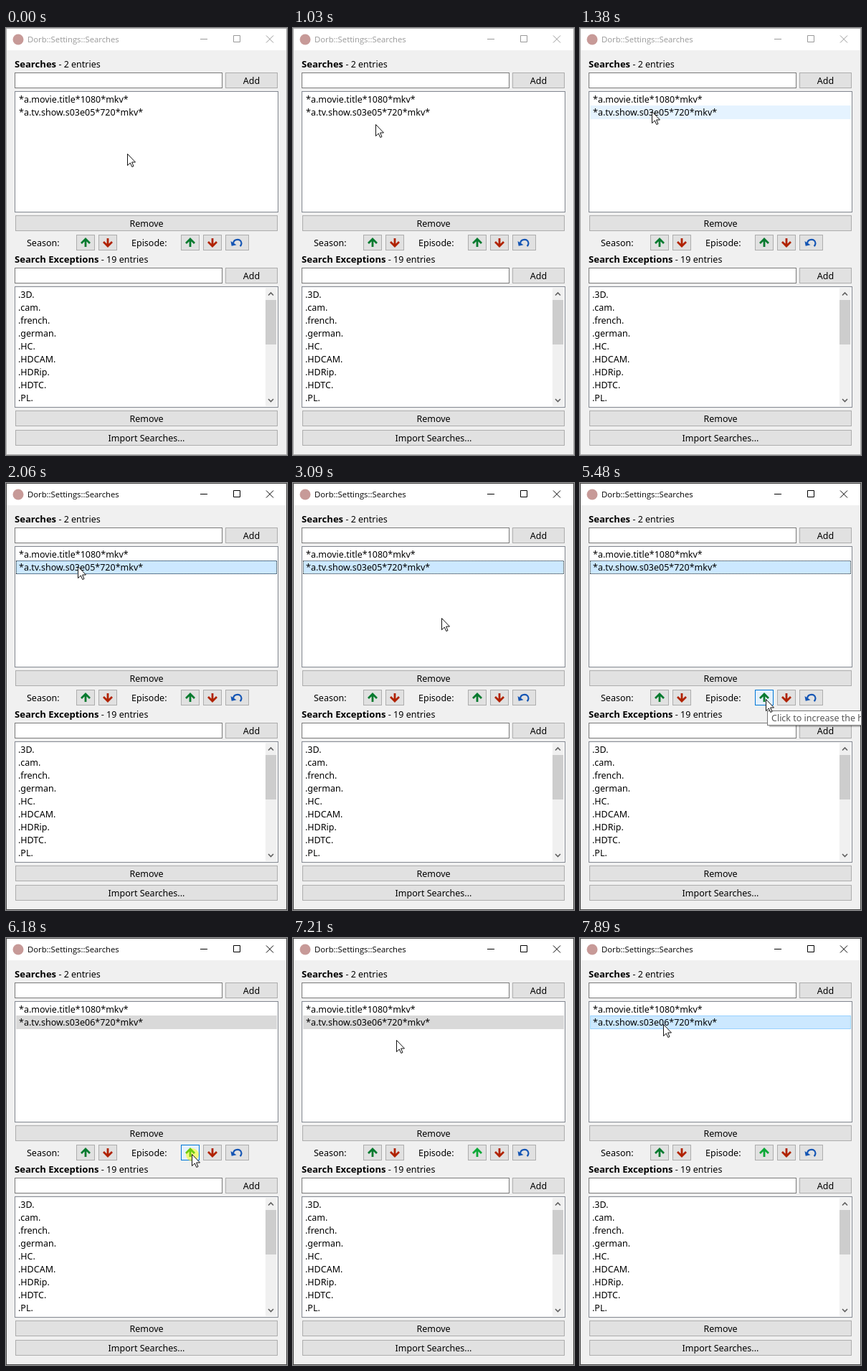
Write an HTML page that moves like this. It is 392 by 595 pixels and loops after 8 s.

```html
<!DOCTYPE html>
<html lang="en">
<head>
<meta charset="utf-8">
<style>
  html, body { margin: 0; width: 100%; height: 100%; overflow: hidden; background: #f0f0f0; }
  svg { display: block; }
  text { font: 12.5px "Noto Sans", "Open Sans", sans-serif; white-space: pre; }
  .bold { font-weight: bold; font-size: 13.1px; }
  #title { font: 11.3px "Open Sans", "Noto Sans", sans-serif; }
  .mid { text-anchor: middle; }
  .line { fill: none; }
</style>
</head>
<body>
<svg id="stage" width="392" height="595" viewBox="0 0 392 595"></svg>
<script>
const LOOP = 8000;
const stage = document.getElementById('stage');

// One-pixel bordered box covering x..x+w, y..y+h
const box = (x, y, w, h, fill, stroke, id = '') =>
  `<rect id="${id}" x="${x + .5}" y="${y + .5}" width="${w - 1}" height="${h - 1}" fill="${fill}" stroke="${stroke}"/>`;
const text = (x, y, s, attrs = '') => `<text x="${x}" y="${y}" ${attrs}>${s}</text>`;
const button = (x, y, w, label = '', id) =>
  box(x, y, w, 22, '#e1e1e1', '#adadad', id) + text(x + w / 2, y + 15.5, label, 'class="mid"');
const line = (d, color, width = 1, attrs = '') =>
  `<path class="line" d="${d}" stroke="${color}" stroke-width="${width}" ${attrs}/>`;
const arrow = (cx, dir, color, id = '') =>
  line(`M${cx} ${299 + 6 * dir}V${299 - 5 * dir}M${cx - 6} ${299 + dir}l6 ${-6 * dir}l6 ${6 * dir}`, color, 2.8, `id="${id}"`);

const heading = (y, name, count) =>
  text(12, y, `<tspan class="bold">${name}</tspan> - ${count} entries`);
const section = (y, name, count) => heading(y, name, count) +
  box(12, y + 7, 290, 22, '#fff', '#7a7a7a') + button(306, y + 7, 73, 'Add') +
  box(12, y + 33, 368, 169, '#fff', '#828790') + button(13, y + 206, 366, 'Remove');

const exceptions = ['3D', 'cam', 'french', 'german', 'HC', 'HDCAM', 'HDRip', 'HDTC', 'PL'];

stage.innerHTML =
  '<rect width="392" height="595" fill="#f0f0f0"/><rect width="392" height="31" fill="#fff"/>' +
  box(0, 0, 392, 595, 'none', '#aaa', 'frame') +
  '<circle cx="17" cy="16" r="7.5" fill="#c79a98"/>' +
  text(30, 20, 'Dorb::Settings::Searches', 'id="title"') +
  line('M271 15.5h10M317.5 10.5h9v9h-9zM363 10.5l10 10M373 10.5l-10 10', '#999', 1, 'id="controls"') +
  section(55, 'Searches', 2) +
  box(14, 108, 364, 19, 'none', 'none', 'row') +
  line('M14 108.5H378M14 126.5H378M14.5 109V126M377.5 109V126', '#222', 1, 'id="focus" stroke-dasharray="1 1"') +
  text(18, 104, '*a.movie.title*1080*mkv*') +
  text(18, 122, '', 'id="show"') +
  text(29, 304, 'Season:') + text(175, 304, 'Episode:') +
  button(98, 288, 26, '', 'seasonUp') + button(129, 288, 26, '', 'seasonDown') +
  button(244, 288, 26, '', 'episodeUp') + button(275, 288, 26) + button(306, 288, 33) +
  arrow(111, 1, '#067a2e') + arrow(142, -1, '#b02200') +
  '<circle id="halo" cx="260" cy="302" r="9" fill="#ff0" fill-opacity=".5"/>' +
  arrow(257, 1, '#067a2e', 'upIcon') + arrow(288, -1, '#b02200') +
  line('M317 300C318 293.5 328 293 328.5 300Q328.5 302.5 326.5 304', '#1455b4', 2.2) +
  '<path d="M313.5 297l1.2 6.8l6.8-1.6z" fill="#1455b4"/>' +
  section(327, 'Search Exceptions', 19) +
  exceptions.map((s, i) => text(17, 376 + 18 * i, `.${s}.`)).join('') +
  '<rect x="362" y="362" width="16" height="165" fill="#f0f0f0"/>' +
  '<rect x="362" y="379" width="15" height="62" fill="#cdcdcd"/>' +
  line('M366 372.5l3.5-3.5l3.5 3.5M366 517l3.5 3.5l3.5-3.5', '#606060', 1.6) +
  button(13, 560, 366, 'Import Searches...') +
  '<g id="tip"><rect x="264" y="320" width="130" height="20" fill="#000" fill-opacity=".25"/>' +
  box(261, 317, 140, 21, '#fff', '#767676') +
  text(267, 332, 'Click to increase the highlighted', 'fill="#575757"') + '</g>' +
  '<path id="cursor" d="M.5 .5V16.6L4.3 13L6.8 18.5L9 17.5L6.6 12H11.5Z" fill="#fff" stroke="#111"/>';

const el = id => document.getElementById(id);
const set = (id, attrs) => { for (const k in attrs) el(id).setAttribute(k, attrs[k]); };
const show = (id, on) => set(id, { visibility: on ? 'visible' : 'hidden' });

const rows = {
  plain: ['none', 'none'],
  hover: ['#e5f3ff', '#e5f3ff'],
  picked: ['#cce8ff', '#cce8ff'],
  hot: ['#cce8ff', '#99d1ff'],
  blurred: ['#d9d9d9', '#d9d9d9']
};
const faces = {
  rest: ['#e1e1e1', '#adadad'],
  fading: ['#e3e9ee', '#6f9abf'],
  hover: ['#e5f1fb', '#0078d7']
};
// Start time, pointer position, list row look
const steps = [
  [0, 169, 175, 'plain'],
  [1030, 115, 134, 'plain'],
  [1380, 100, 116, 'hover'],
  [2060, 100, 116, 'hot'],
  [2740, 100, 124, 'hot'],
  [3090, 207, 188, 'picked'],
  [3440, 122, 263, 'picked'],
  [3770, 148, 301, 'picked'],
  [4120, 224, 301, 'picked'],
  [4470, 258, 301, 'picked'],
  [4800, 259, 301, 'picked'],
  [6180, 259, 301, 'blurred'],
  [6510, 254, 301, 'blurred'],
  [6860, 258, 301, 'blurred'],
  [7210, 144, 142, 'blurred'],
  [7540, 121, 120, 'hot'],
  [7890, 116, 120, 'hot']
];

function paint([fill, stroke], id) { set(id, { fill, stroke }); }

function draw(t) {
  const within = (a, b) => t >= a && t < b;
  const [, x, y, row] = steps.findLast(s => s[0] <= t);
  const active = t >= 2060, clicked = t >= 6180;

  set('cursor', { transform: `translate(${x} ${y})` });
  paint(rows[row], 'row');
  show('focus', active && !clicked);
  el('show').textContent = `*a.tv.show.s03e0${clicked ? 6 : 5}*720*mkv*`;

  set('frame', { stroke: active ? '#484848' : '#aaa' });
  set('title', { fill: active ? '#000' : '#999' });
  set('controls', { stroke: active ? '#000' : '#999' });

  const overSeason = within(3770, 4120);
  paint(faces[overSeason ? 'fading' : 'rest'], 'seasonUp');
  paint(faces[overSeason ? 'hover' : 'rest'], 'seasonDown');
  paint(faces[within(4470, 4800) ? 'fading' : within(4800, 7210) ? 'hover' : 'rest'], 'episodeUp');
  set('upIcon', { stroke: !clicked ? '#067a2e' : t < 6510 ? '#6ccb10' : '#0aa836' });
  show('halo', within(6180, 6510));
  show('tip', within(5480, 6180));
}

function frame() {
  draw(performance.now() % LOOP);
  requestAnimationFrame(frame);
}
frame();
</script>
</body>
</html>
```
